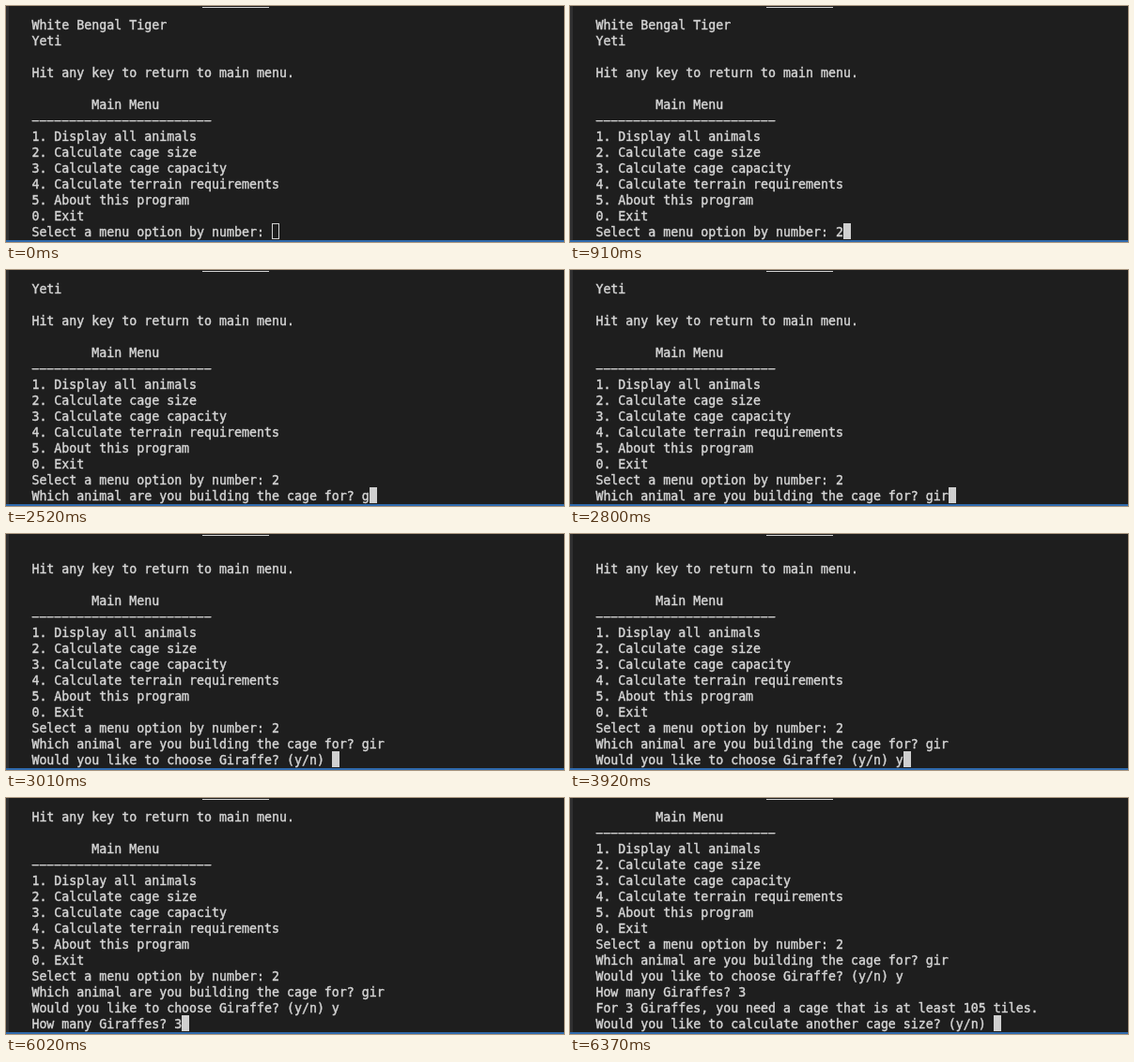
An HTML page for the animation above (8000 ms loop, 594 by 252 pixels).

```html
<!DOCTYPE html>
<html lang="en">
<head>
<meta charset="utf-8">
<title>Cage size calculator</title>
<style>
  html, body { margin: 0; width: 100%; height: 100%; overflow: hidden; background: #1e1e1e; }
  #stage { position: relative; width: 594px; height: 252px; overflow: hidden; background: #1e1e1e; }
  #stage > * { position: absolute; }
  #edge { left: 0; top: 0; width: 3px; height: 250px; background: #303031; }
  #tab { left: 209px; top: 1px; width: 71px; height: 1px; background: #d4d4d4; }
  #status { left: 0; top: 250px; width: 594px; height: 2px; background: #2f6aad; }
  #screen {
    left: 27.4px; top: 12px; margin: 0; color: #d6d6d6; white-space: pre;
    font: 13.288px/17px "DejaVu Sans Mono", monospace;
    -webkit-text-stroke: 0.4px #d6d6d6;
  }
  #cursor { top: 232px; width: 8px; height: 17px; box-sizing: border-box; border: 1px solid #d0d0d0; background: #d0d0d0; }
  #cursor.hollow { background: none; }
</style>
</head>
<body>
<div id="stage">
  <div id="edge"></div>
  <div id="tab"></div>
  <pre id="screen"></pre>
  <div id="cursor"></div>
  <div id="status"></div>
</div>
<script>
const LOOP = 8000, ROWS = 14, LEFT = 27, CELL = 8, FOCUS = 490;

const start = [
  "White Bengal Tiger",
  "Yeti",
  "",
  "Hit any key to return to main menu.",
  "",
  "        Main Menu",
  "\u2212".repeat(24),
  "1. Display all animals",
  "2. Calculate cage size",
  "3. Calculate cage capacity",
  "4. Calculate terrain requirements",
  "5. About this program",
  "0. Exit",
  "Select a menu option by number: "
].join("\n");

// [time, text written to the terminal]
const output = [
  [0, start],
  [910, "2"],
  [1330, "\nWhich animal are you building the cage for? "],
  [2520, "g"],
  [2660, "i"],
  [2800, "r"],
  [3010, "\nWould you like to choose Giraffe? (y/n) "],
  [3920, "y"],
  [4480, "\nHow many Giraffes? "],
  [6020, "3"],
  [6370, "\nFor 3 Giraffes, you need a cage that is at least 105 tiles."
       + "\nWould you like to calculate another cage size? (y/n) "]
];

const screen = document.getElementById("screen");
const cursor = document.getElementById("cursor");
let shown = "";

function draw() {
  const t = performance.now() % LOOP;
  const text = output.filter(([at]) => at <= t).map(([, s]) => s).join("");
  if (text !== shown) {
    const lines = text.split("\n").slice(-ROWS);
    screen.textContent = lines.join("\n");
    cursor.style.left = LEFT + CELL * lines[ROWS - 1].length + "px";
    shown = text;
  }
  cursor.classList.toggle("hollow", t < FOCUS);
  requestAnimationFrame(draw);
}
draw();
</script>
</body>
</html>
```
